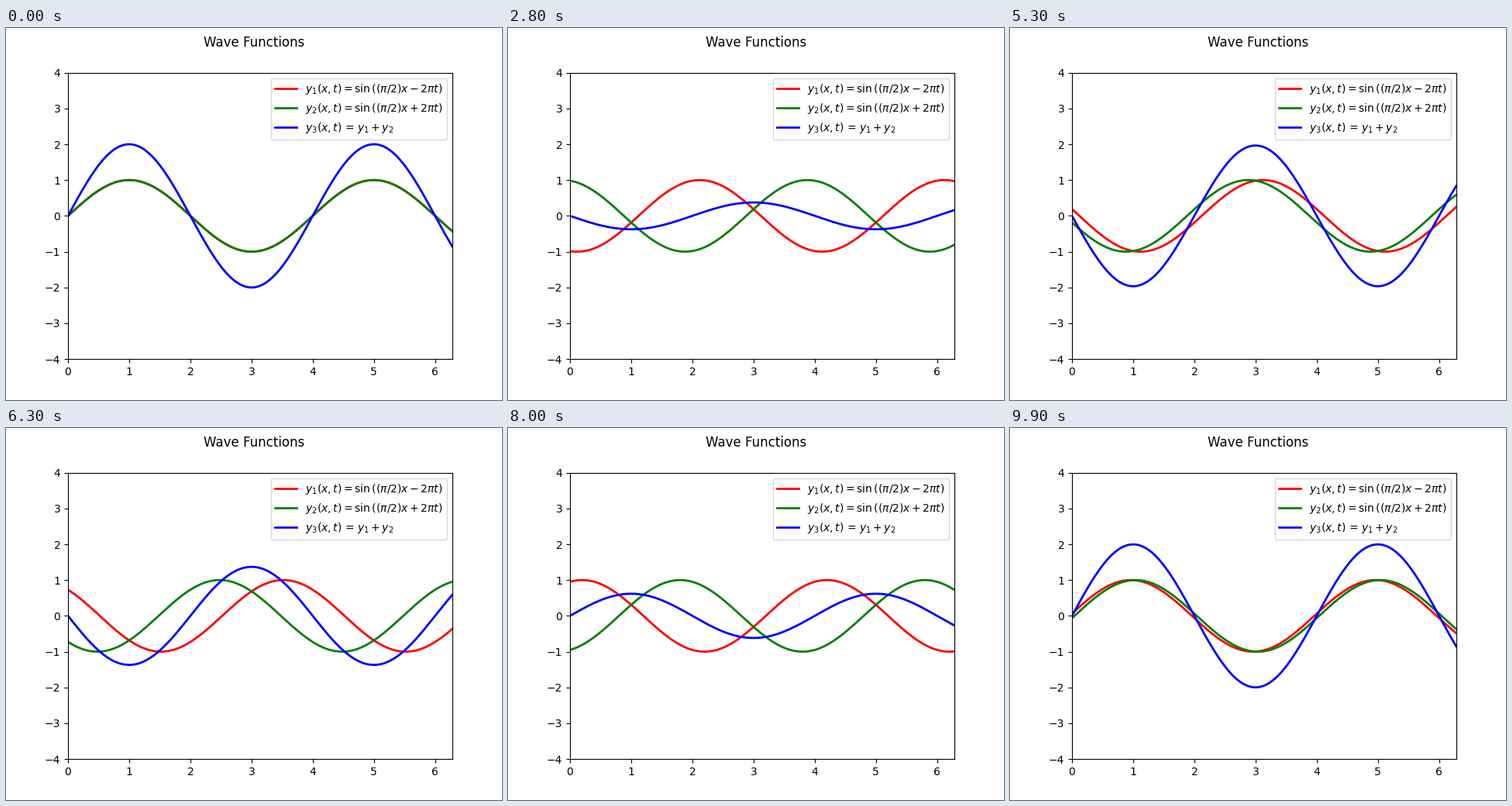
These frames come from a looping animation (640 by 480 pixels, 10000 ms). A matplotlib script:

```python
import numpy as np
import matplotlib.pyplot as plt
from matplotlib.animation import FuncAnimation

FRAMES = 100
INTERVAL = 100  # ms

x = np.linspace(0, 2 * np.pi, 1000)

fig, ax = plt.subplots(figsize=(6.4, 4.8), dpi=100)
fig.suptitle("Wave Functions")
ax.set_xlim(0, 2 * np.pi)
ax.set_ylim(-4, 4)


def wave_line(color, label):
    return ax.plot([], [], color=color, lw=2, label=label)[0]


right = wave_line("red", r"$y_1(x,t)=\sin\left((\pi/2)x-2\pi t\right)$")
left = wave_line("green", r"$y_2(x,t)=\sin\left((\pi/2)x+2\pi t\right)$")
total = wave_line("blue", r"$y_3(x,t)$ = $y_1+y_2$")
ax.legend(loc="upper right")


def update(frame):
    phase = 2 * np.pi * frame / FRAMES
    y1 = np.sin(np.pi / 2 * x - phase)
    y2 = np.sin(np.pi / 2 * x + phase)
    right.set_data(x, y1)
    left.set_data(x, y2)
    total.set_data(x, y1 + y2)
    return right, left, total


anim = FuncAnimation(fig, update, frames=FRAMES, interval=INTERVAL,
                     repeat=True, repeat_delay=0)
plt.show()
```
